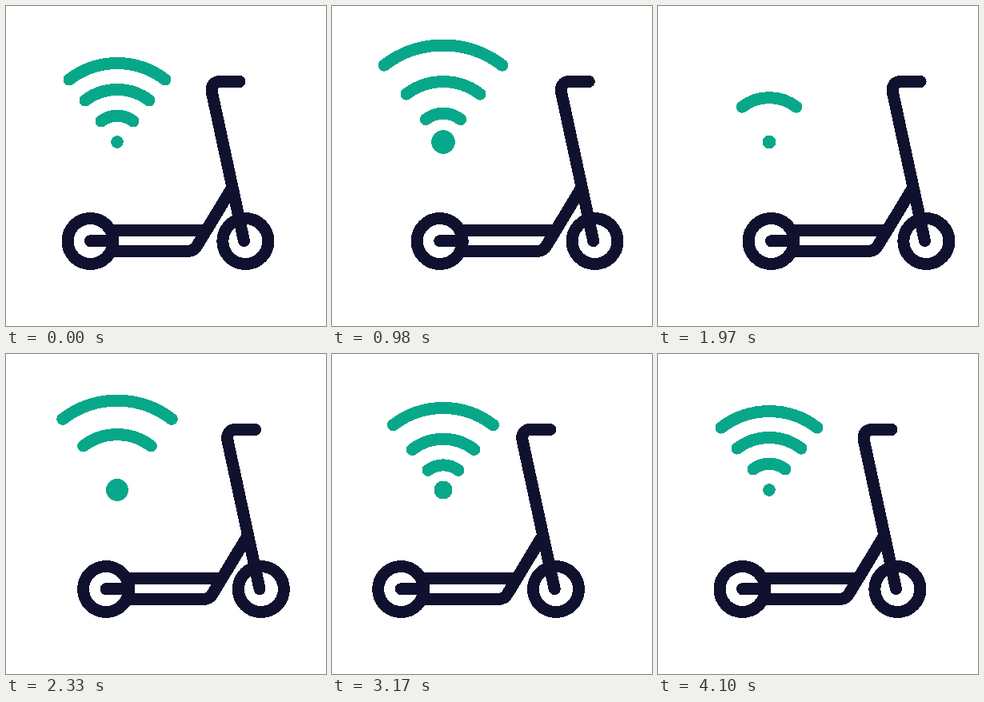
An HTML page for the animation above (4160 ms loop, 400x400 px).

```html
<!DOCTYPE html>
<html lang="en">
<head>
<meta charset="utf-8">
<title>Connected scooter</title>
<style>
  html, body { margin: 0; width: 100%; height: 100%; overflow: hidden; background: #fff; }
  svg { display: block; width: 100vw; height: 100vh; shape-rendering: crispEdges; }
  .line { fill: none; stroke-width: 15; stroke-linecap: round; stroke-linejoin: round; }
  #scooter { stroke: #10112e; }
  #signal { stroke: #07a88a; }
  #dot { fill: #07a88a; stroke: none; }
</style>
</head>
<body>
<svg viewBox="0 0 400 400">
  <g id="signal" class="line">
    <circle id="dot" cx="139" cy="170" r="7.8"/>
  </g>
  <g id="scooter" class="line">
    <circle cx="105.5" cy="294" r="28.5"/>
    <circle cx="299.3" cy="294" r="28.5"/>
    <path d="M105.5 293.7H134"/>
    <path d="M134 280.5H247" stroke-linecap="butt"/>
    <path d="M134 306.5H227Q235.5 306.5 239.5 298.5L281.5 229" stroke-linecap="butt"/>
    <path d="M297.5 293.7L257.4 108C255.8 100.5 260 94.5 267.3 94.5H292"/>
  </g>
</svg>
<script>
  const LOOP = 4160, HOLD = 500, STEP = 30, LAST = 120;
  const CX = 139, CY = 170, SIN = 0.61, COS = Math.sqrt(1 - SIN * SIN);
  const GAP = 32.8, DRIFT = 22.6, SPEED = 4.7, MAX_R = 139;

  const clamp = u => Math.max(0, Math.min(1, u));
  const smooth = u => u * u * (3 - 2 * u);

  // Eased leg of a journey; a power below 1 brings the fast part forward.
  const leg = (t, from, to, distance, power = 1) =>
    distance * smooth(clamp((t - from) / (to - from)) ** power);

  const ride = t => leg(t, 0, 40, 40.7, 0.47) + leg(t, 40, 93, -61) + leg(t, 93, LAST, 20.3);

  // Two pulses, then rest.
  const pulse = t => 7.8 + 8.2 * Math.abs(Math.sin(Math.PI * Math.min(t, 96) / 48));

  // Outer to inner: an arc drifts until `leave`, flies off, and is reborn at `born`.
  const waves = [
    { leave: 16, power: 2, born: 50, settle: 9 },
    { leave: 32, power: 1.2, born: 62.3, settle: 8.3 },
    { leave: 49, power: 1.85, born: 74, settle: 5 }
  ];

  function leaving(wave, i, t) {
    const drift = DRIFT * Math.min(1, t / wave.leave) ** wave.power;
    return GAP * (3 - i) + drift + SPEED * Math.max(0, t - wave.leave);
  }

  function arriving(wave, i, t) {
    const rise = 1 - Math.exp(-Math.max(0, t - wave.born) / wave.settle);
    const bounce = 0.09 * Math.sin(Math.PI * clamp((t - 84 - 4 * i) / 24));
    return GAP * (3 - i) * (rise + bounce);
  }

  function arcPath(r) {
    if (r < 8 || r > MAX_R) return '';
    const y = CY - r * COS;
    return `M${CX - r * SIN} ${y}A${r} ${r} 0 0 1 ${CX + r * SIN} ${y}`;
  }

  const scooter = document.getElementById('scooter');
  const dot = document.getElementById('dot');
  const arcs = waves.map(() => {
    const path = document.createElementNS('http://www.w3.org/2000/svg', 'path');
    return document.getElementById('signal').appendChild(path);
  });

  function draw(ms) {
    const t = Math.max(0, Math.min(LAST, Math.floor((ms % LOOP - HOLD) / STEP)));
    scooter.setAttribute('transform', `translate(${ride(t)} 0)`);
    dot.setAttribute('r', pulse(t));
    waves.forEach((wave, i) => {
      const paths = [leaving, arriving].map(radius => arcPath(radius(wave, i, t)));
      arcs[i].setAttribute('d', paths.join(''));
    });
  }

  const start = performance.now();
  function tick() {
    draw(performance.now() - start);
    requestAnimationFrame(tick);
  }
  tick();
</script>
</body>
</html>
```
